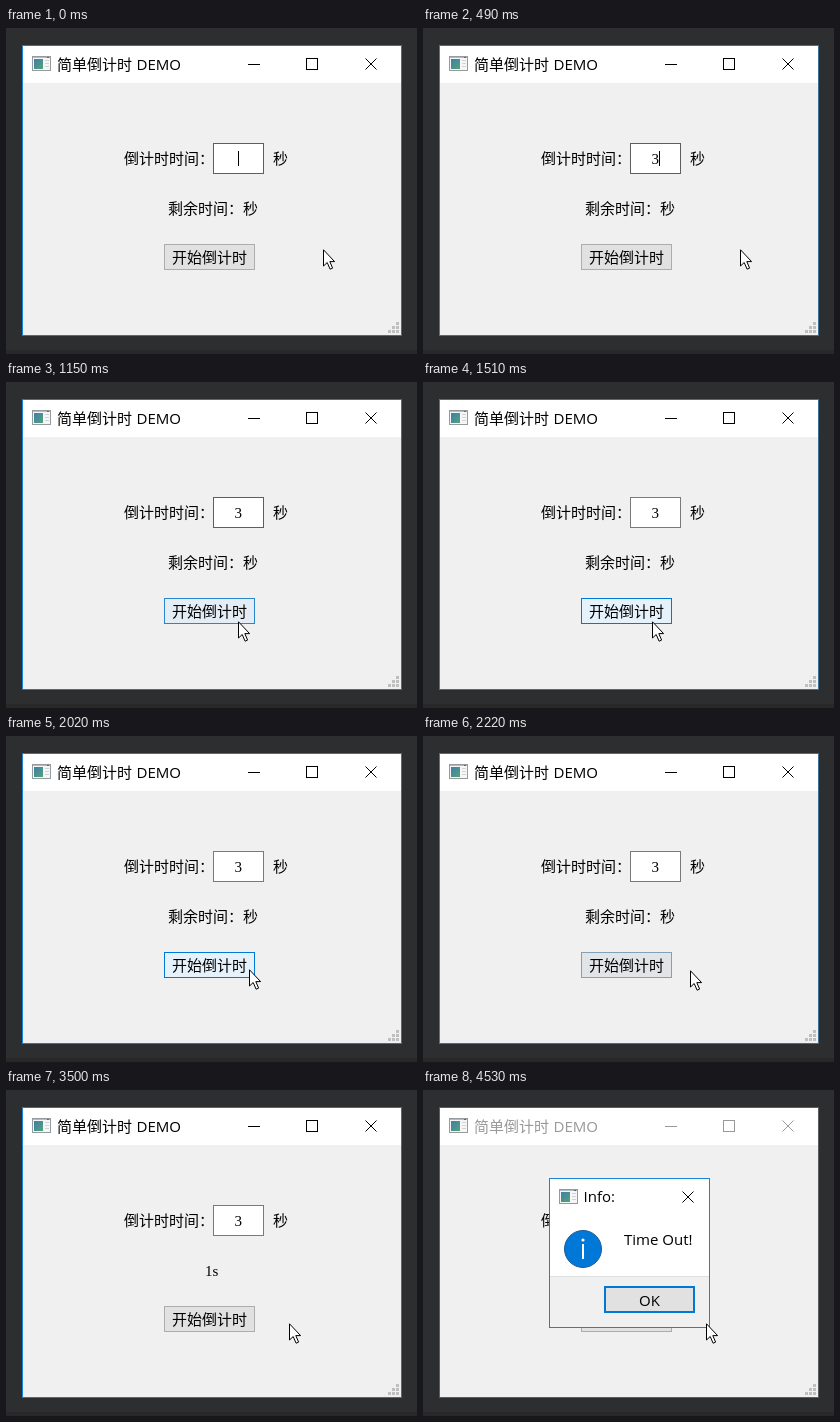
Write an HTML page that moves like this. It is 411 px wide and 326 px high and loops after 5.37 s.

```html
<!DOCTYPE html>
<html lang="zh-CN">
<head>
<meta charset="utf-8">
<title>Countdown</title>
<style>
html, body { margin: 0; width: 100%; height: 100%; overflow: hidden; background: #2d2e30; }
svg { display: block; width: 411px; height: 326px; }
text { font: 15px "Noto Sans CJK SC", "Noto Sans CJK", sans-serif; white-space: pre; }
.body { font-weight: 300; }
.latin { font-family: "Open Sans", "Noto Sans", sans-serif; }
.num { font-family: "Liberation Serif", serif; }
.crisp { shape-rendering: crispEdges; }
</style>
</head>
<body>
<svg viewBox="0 0 411 326" lang="zh-CN">
  <defs>
    <linearGradient id="pane" x2="1" y2="1">
      <stop stop-color="#3d7fae"/><stop offset="1" stop-color="#55a277"/>
    </linearGradient>
    <g id="icon">
      <rect x=".5" y=".5" width="18" height="14" fill="#f6f6f6" stroke="#949a9e"/>
      <path d="M1 1.5H18" stroke="#b4bac0"/>
      <rect x="2" y="3" width="9" height="10" fill="url(#pane)"/>
      <path d="M13 4.5H17M13 7.5H17M13 10.5H17" stroke="#d0d4d6"/>
      <path d="M15 1.5H17" stroke="#5b6a72"/>
    </g>
    <path id="cross" d="M.5 .5L11.5 11.5M11.5 .5L.5 11.5" fill="none"/>
  </defs>

  <rect width="411" height="326" fill="#2d2e30"/>
  <rect y="322" width="411" height="4" fill="#2a2728"/>

  <g class="crisp">
    <rect x="17" y="18" width="378" height="37" fill="#fff"/>
    <rect x="17" y="55" width="378" height="252" fill="#f0f0f0"/>
    <rect id="edge" x="16.5" y="17.5" width="379" height="290" fill="none"/>
    <path id="side" d="M16.5 17V308"/>
  </g>
  <use href="#icon" x="26" y="28"/>
  <g id="caption">
    <text x="51" y="42">简单倒计时</text>
    <text class="latin" x="130.5" y="42">DEMO</text>
  </g>
  <g id="controls">
    <path class="crisp" d="M242 36.5H254" fill="none"/>
    <rect class="crisp" x="300.5" y="30.5" width="11" height="11" fill="none"/>
    <use href="#cross" x="359" y="30"/>
  </g>

  <text class="body" x="118" y="136">倒计时时间：</text>
  <rect id="field" class="crisp" x="207.5" y="115.5" width="50" height="30" fill="#fff"/>
  <text id="digit" class="num" x="228.5" y="136">3</text>
  <rect id="caret" class="crisp" y="123" width="1" height="15"/>
  <text class="body" x="267" y="136">秒</text>
  <text id="label" class="body" x="162" y="186">剩余时间：秒</text>
  <text id="left" class="num" x="199 206.5" y="186"></text>
  <rect id="button" class="crisp" x="158.5" y="216.5" width="90" height="25"/>
  <text class="body" x="166" y="235">开始倒计时</text>
  <g id="grip" class="crisp" fill="#bfbfbf"></g>

  <g id="dialog">
    <rect class="crisp" x="126.5" y="88.5" width="160" height="149" fill="#fff" stroke="#1883d7"/>
    <rect class="crisp" x="127" y="186" width="159" height="51" fill="#f0f0f0"/>
    <path class="crisp" d="M127 186.5H286" stroke="#dfdfdf"/>
    <use href="#icon" x="136" y="99"/>
    <text class="latin" x="160.5" y="112">Info:</text>
    <use href="#cross" x="259" y="101" stroke="#000"/>
    <circle cx="160" cy="159" r="18.5" fill="#0078d7" stroke="#1d5c96"/>
    <circle cx="160" cy="150" r="1.6" fill="#fff"/>
    <path d="M160 154V169" stroke="#fff" stroke-width="2"/>
    <text class="latin" x="201" y="155">Time Out!</text>
    <rect class="crisp" x="182" y="197" width="89" height="25" fill="#e1e1e1" stroke="#0078d7" stroke-width="2"/>
    <text class="latin" x="226.5" y="216" text-anchor="middle">OK</text>
  </g>

  <path id="cursor" d="M.5 .8V17L4.2 13.5 7.1 20.2 9.6 19.1 6.8 12.6H11.6Z" fill="#fff" stroke="#000"/>
</svg>
<script>
const LOOP = 5370, STEP = 50;
const $ = id => document.getElementById(id);

// Pointer waypoints: time, x, y
const path = [
  [720, 317, 221], [770, 311, 223], [820, 297, 229], [870, 283, 234],
  [970, 258, 238], [1070, 238, 239], [1150, 229, 239], [1520, 229, 239],
  [1620, 235, 236], [1710, 240, 234], [1900, 240, 234], [2020, 243, 233],
  [2150, 258, 234], [2270, 274, 234], [2400, 283, 233]
];

const ramp = (t, a, b) => Math.min(1, Math.max(0, (t - a) / (b - a)));
const within = (t, a, b) => t >= a && t < b;
const mix = (a, b, k) => `rgb(${a.map((v, i) => Math.round(v + (b[i] - v) * k))})`;
const show = (id, on) => $(id).setAttribute("display", on ? "inline" : "none");
const paint = (id, attrs) => {
  for (const key in attrs) $(id).setAttribute(key, attrs[key]);
};

function pointer(t) {
  const s = Math.floor((t - 20) / STEP) * STEP + 20;
  const i = path.findIndex(p => p[0] > s);
  if (i === 0) return path[0].slice(1);
  if (i < 0) return path[path.length - 1].slice(1);
  const a = path[i - 1], b = path[i], k = ramp(s, a[0], b[0]);
  return [1, 2].map(n => Math.round(a[n] + (b[n] - a[n]) * k));
}

function draw(t) {
  const done = t >= 4530;
  const typed = t >= 490;
  const pressed = within(t, 1330, 1480);
  const hover = ramp(t, 1000, 1200) * (1 - ramp(t, 2070, 2270));

  paint("edge", { stroke: done ? "#5c5d5e" : "#3f6f94" });
  paint("side", { stroke: done ? "#5c5d5e" : "#1883d7" });
  paint("caption", { fill: done ? "#999" : "#000" });
  paint("controls", { stroke: done ? "#999" : "#000" });

  show("digit", typed);
  show("caret", t < 80 || within(t, 490, 1020));
  paint("caret", { x: typed ? 236 : 232 });
  paint("field", { stroke: t < 1330 ? "#5e5e5e" : "#7a7a7a" });

  paint("button", pressed
    ? { fill: "#cce4f7", stroke: "#005499" }
    : { fill: mix([225, 225, 225], [229, 241, 251], hover),
        stroke: mix([173, 173, 173], [0, 120, 215], hover) });

  show("label", t < 2480);
  $("left").textContent = t < 2480 ? "" : t < 3500 ? "2s" : done ? "0s" : "1s";
  show("dialog", done);
  paint("cursor", { transform: `translate(${pointer(t)})` });
}

// Size grip: a triangle of small squares
for (let row = 0; row < 3; row++) {
  for (let col = 2 - row; col < 3; col++) {
    const dot = document.createElementNS("http://www.w3.org/2000/svg", "rect");
    $("grip").append(dot);
    for (const [key, v] of Object.entries({ x: 382 + col * 4, y: 294 + row * 4, width: 3, height: 3 }))
      dot.setAttribute(key, v);
  }
}

const start = performance.now();
function tick() {
  draw((performance.now() - start) % LOOP);
  requestAnimationFrame(tick);
}
tick();
</script>
</body>
</html>
```
